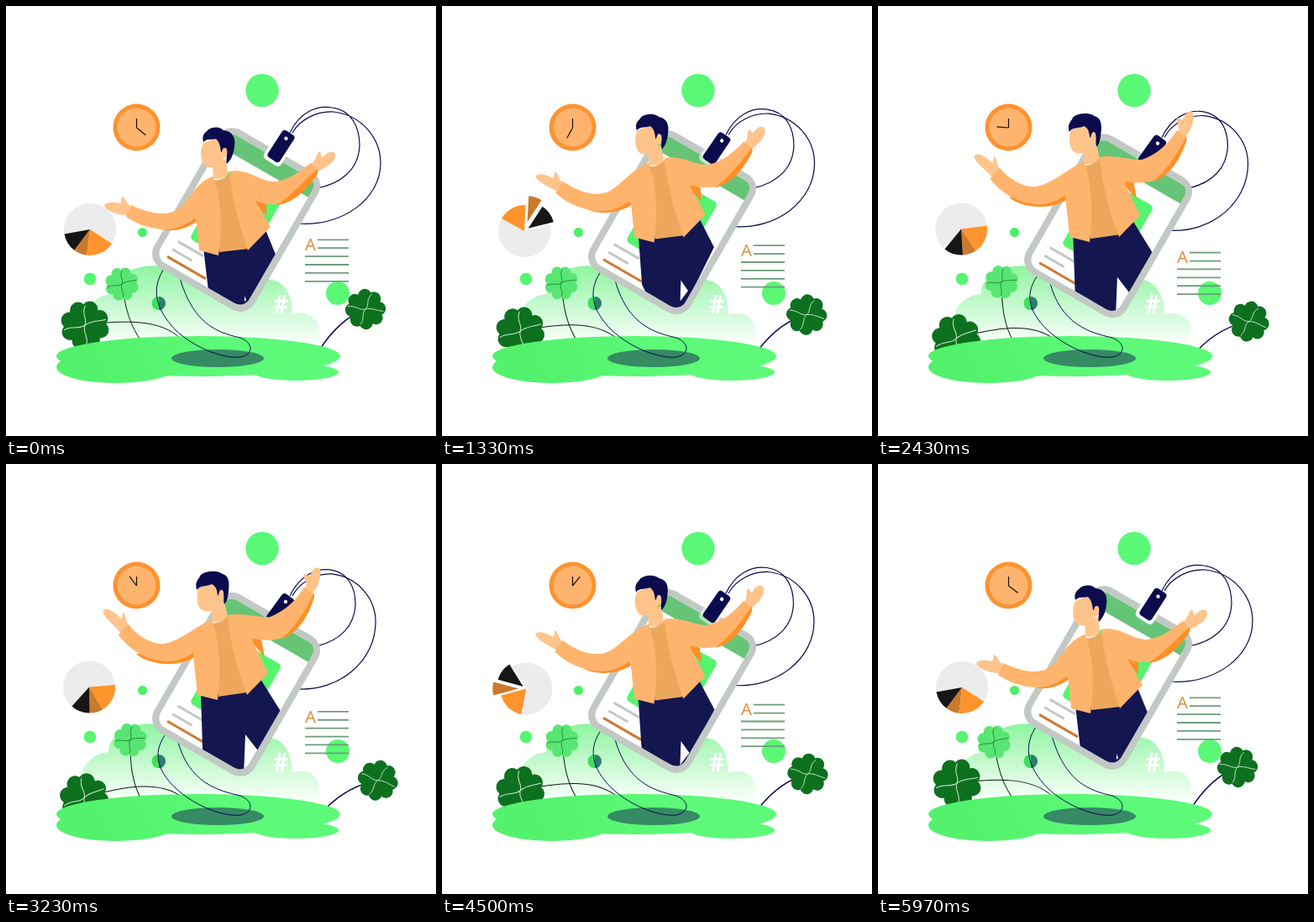
Animation, 512 px wide and 512 px high, one loop 6 s. Source, as an HTML page:

```html
<!DOCTYPE html>
<html lang="en">
<head>
<meta charset="utf-8">
<title>Man stepping out of a phone</title>
<style>
html, body { margin: 0; width: 100%; height: 100%; overflow: hidden; background: #fff; }
svg { display: block; width: 100vw; height: 100vh; }
</style>
</head>
<body>
<svg viewBox="0 0 512 512">
  <defs>
    <linearGradient id="mist" x1="0" y1="0" x2="0" y2="1">
      <stop offset="0" stop-color="#8ef4a0"/><stop offset="0.95" stop-color="#fff"/>
    </linearGradient>
    <linearGradient id="grass" gradientUnits="userSpaceOnUse" x1="120" y1="450" x2="260" y2="390">
      <stop offset="0" stop-color="#52f26c"/><stop offset="1" stop-color="#5cfa78"/>
    </linearGradient>
    <clipPath id="screen"><rect id="screenBox" x="-61" y="-87" width="122" height="174" rx="13"/></clipPath>
  </defs>
  <g id="scene"></g>
</svg>
<script>
const LOOP = 6000, NAVY = '#0b0b4d', SKIN = '#fec48b', COAT = '#ffb46d', DEEP = '#ff8f26';
const sceneEl = document.getElementById('scene');
const screenBox = document.getElementById('screenBox');

const ease = x => (1 - Math.cos(Math.PI * Math.min(1, Math.max(0, x)))) / 2;
const seg = (t, a, b) => ease((t - a) / (b - a));
const circle = (x, y, r, fill) => `<circle cx="${x}" cy="${y}" r="${r}" fill="${fill}"/>`;
const oval = (x, y, rx, ry, fill) => `<ellipse cx="${x}" cy="${y}" rx="${rx}" ry="${ry}" fill="${fill}"/>`;
const path = (d, fill) => `<path d="${d}" fill="${fill}"/>`;
const line = (d, color, width = 1) => `<path d="${d}" fill="none" stroke="${color}" stroke-width="${width}"/>`;
const group = (transform, body) => `<g transform="${transform}">${body}</g>`;

// Blend two paths that share the same commands.
function mix(a, b, p) {
  const re = /-?[\d.]+/g, to = b.match(re);
  let i = 0;
  return a.replace(re, n => (+n + (to[i++] - n) * p).toFixed(2));
}

// Man: [fill, arms-low pose, arms-high pose]
const legs = [
  ['#13164f',
    'M235 288L308 264L321 296L286 366L252 364L241 339Z',
    'M232 272L304 258L328 296L290 374L250 374L234 342Z'],
  ['#fff', 'M284 345L286 350L284 352Z', 'M285 322L303 345L283 372Z']
];
const leftArm = [
  [SKIN, 'M148 238C144 236 142 228 138 227C136 230 139 234 135 235C128 233 118 233 117 238C120 244 132 249 145 249Z',
    'M147 192C142 188 144 180 140 176C138 178 140 184 137 183C131 177 121 169 116 174C115 180 126 188 137 201Z'],
  [DEEP, 'M180 262C190 271 212 268 228 256L222 248Z', 'M155 226C172 241 208 241 224 230L222 220Z'],
  [COAT, 'M247 203C225 208 216 238 201 244C185 251 166 245 149 237L143 251C158 262 180 267 194 266C208 264 220 258 230 248Z',
    'M245 185C225 194 206 212 186 214C170 213 155 203 146 190L134 203C148 222 168 234 193 235C208 234 218 229 228 220Z']
];
const body = [
  [SKIN, 'M246 186L262 182L264 200C260 206 250 207 247 204Z', 'M244 168L260 164L264 182C260 188 249 190 245 187Z'],
  ['#eda75c', 'M246 207C254 209 262 204 268 198L290 250L289 289L254 293Z',
    'M244 189C252 191 260 186 264 180L288 232L287 272L253 277Z'],
  [DEEP, 'M288 228L310 236L310 250Z', 'M285 203L304 209L308 230Z'],
  [COAT, 'M247 203C232 210 222 235 227 260L230 291L253 297C258 260 257 235 247 203Z',
    'M245 185C230 192 220 212 224 238L228 275L252 281C256 245 255 215 245 185Z'],
  [COAT, 'M266 197C280 194 290 200 294 210L297 232L315 263L288 291C278 260 270 235 266 197Z',
    'M263 180C278 177 287 180 290 188L294 212L312 249L287 275C275 245 268 215 263 180Z'],
  [SKIN, 'M363 188C369 185 369 177 373 173C377 174 374 181 377 180C381 176 388 170 392 176C393 185 384 191 371 197Z',
    'M356 148C360 142 354 136 354 131C358 130 360 136 363 130C365 123 372 120 374 126C375 135 372 145 365 154Z'],
  [COAT, 'M268 197C290 194 300 208 318 209C338 208 350 196 363 187L372 197C356 216 342 232 322 236C308 237 296 232 288 228Z',
    'M266 180C285 177 300 183 314 182C332 175 346 162 355 146L367 155C360 178 348 200 328 207C312 212 296 209 285 205Z'],
  [DEEP, 'M371 194L371 200C357 221 341 235 322 237C342 224 355 208 371 194Z',
    'M367 152L367 158C360 181 348 201 328 208C342 196 355 178 367 152Z'],
  [SKIN, 'M235 163C230 172 231 190 241 192C251 194 257 187 259 181C266 181 267 169 260 169L254 156Z',
    'M229 148C226 158 227 173 236 175C247 177 253 170 255 164C262 163 262 151 256 151L250 140Z'],
  [NAVY, 'M235 162C232 152 240 149 241 147C247 143 255 144 259 148C268 149 274 155 272 167C271 178 267 184 263 188C261 183 266 170 261 169C257 168 258 174 256 174C255 168 255 163 250 158C245 160 240 157 235 162Z',
    'M227 150C224 140 230 137 231 133C236 127 252 126 258 131C265 133 266 140 265 150C264 160 263 164 260 167C258 162 261 152 257 150C253 149 254 156 252 157C251 151 251 146 245 143C239 146 232 144 227 150Z']
];
const draw = (parts, p) => parts.map(([fill, a, b]) => path(mix(a, b, p), fill)).join('');

function clover(x, y, size, turn, fill, vein) {
  const leaf = circle(-7.8, -17.5, 9.6, fill) + circle(7.8, -17.5, 9.6, fill) + path('M0 4L-16 -12L0 -22L16 -12Z', fill);
  const leaves = [45, 135, 225, 315].map(a => group(`rotate(${a})`, leaf)).join('');
  const veins = line('M-25 4C-14 -1 -8 5 0 0S14 -3 25 -5M2 -23C-4 -12 4 -8 0 0S4 14 0 23', vein);
  return group(`translate(${x} ${y}) rotate(${turn}) scale(${size / 28.5})`, leaves + veins);
}

function plants(p) {
  return group(`rotate(${-9 * p} 205 394)`,
      line('M94 380C145 373 185 374 208 396', '#101a14') + clover(94, 380, 29, -4, '#0d701f', '#c9e8ce')) +
    group(`rotate(${8.5 * p} 160 397)`,
      line('M138 331C142 360 148 382 162 400', '#101a14') + clover(138, 331, 20, -4, '#58e672', '#156b2a')) +
    line(mix('M428 361C408 368 388 386 373 410', 'M443 377C420 381 400 391 381 410', p), NAVY, 1.5) +
    clover(428 + 15 * p, 361 + 16 * p, 24, 18 + 14 * p, '#0d701f', '#c9e8ce');
}

function clock(t) {
  return circle(155.5, 144.5, 28, '#ff9230') + circle(155.5, 144.5, 23, '#ffb46d') +
    line('M155.5 145V134', '#16110b', 1.2) +
    group(`rotate(${129 + t * 360 / LOOP} 155.5 145)`, line('M155.5 145V131', '#16110b', 1.2));
}

function slice(from, to, fill, pull) {
  const at = (deg, r) => [100 + r * Math.cos(deg * Math.PI / 180), 266 + r * Math.sin(deg * Math.PI / 180)];
  const [x, y] = at((from + to) / 2, pull);
  return group(`translate(${x - 100} ${y - 266})`,
    path(`M100 266L${at(from, 31)}A31 31 0 ${to - from > 180 ? 1 : 0} 1 ${at(to, 31)}Z`, fill));
}

function pie(t) {
  const turn = 320 * seg(t, 0, 2500) + 108 * seg(t, 3150, 4050) + 292 * seg(t, 4500, 6000);
  const pull = 12 * (seg(t, 950, 1400) - seg(t, 1650, 2000) + seg(t, 4400, 4550) - seg(t, 5300, 5700));
  return group(`rotate(${turn} 99 267)`,
    slice(170, 393, '#ececec', 0) + slice(33, 97, '#ff942c', 0) +
    slice(97, 127, '#c97a2b', pull) + slice(127, 170, '#161616', pull / 2));
}

function note(p) {
  let out = `<text x="356" y="291" font-family="'Open Sans', sans-serif" font-size="20.5" fill="#e08a3a">A</text>`;
  for (let i = 0; i < 6; i++) out += line(`M${i < 2 ? 371 : 356} ${278.3 + 9.9 * i}H408`, '#6f9d7c', 1.8);
  return group(`translate(0 ${16.8 * p})`, out);
}

function strings(p) {
  return line(mix(
    'M338 151C350 126 370 118 388 121C412 124 421 145 421 166C420 195 398 212 370 217',
    'M338 157C350 132 370 124 386 126C408 129 416 148 416 167C415 193 398 210 370 217', p), NAVY, 1.2) +
    line(mix(
    'M341 151C350 135 370 125 390 126C424 130 446 158 446 187C446 230 400 263 348 259',
    'M341 157C350 140 370 130 388 131C420 135 440 161 440 188C440 234 398 271 346 268', p), NAVY, 1.2);
}

function phone() {
  return `<rect x="-69" y="-95" width="138" height="190" rx="20" fill="#c2c9c4"/>
    <rect x="-61" y="-87" width="122" height="174" rx="13" fill="#fff"/>
    <path d="M-61 -66V-74Q-61 -87 -48 -87H48Q61 -87 61 -74V-66Z" fill="#66c476"/>
    <rect x="-37" y="-47" width="73" height="94" rx="5" fill="#55f46e"/>` +
    line('M-47 57H-12M-48 68.5H-21', '#c2c9c4', 3) + line('M-49 79H4', '#cc7a33', 3);
}

function tag(p) {
  return group(`translate(${327.5 - p} ${167 + 6 * p}) rotate(${33 + 3 * p})`,
    `<rect x="-12" y="5" width="24" height="18" rx="5" fill="#fff" opacity="${1 - p}"/>
     <rect x="-8.5" y="-19" width="17" height="38" rx="4" fill="${NAVY}"/>` + circle(0, -11, 2.2, '#fff'));
}

function backdrop(p) {
  return group(`translate(373 0) scale(${1 + .016 * p} 1) translate(-373 0)`,
      path('M95 410C87 384 92 346 126 343C126 318 160 306 186 310C230 305 270 320 300 328C330 318 342 345 341 368C354 362 373 368 373 386V410Z', 'url(#mist)')) +
    `<text x="318" y="365.5" font-family="Roboto, sans-serif" font-weight="900" font-size="32" fill="#fff">#</text>` +
    plants(p) +
    oval(229, 417, 169, 24, 'url(#grass)') + oval(131, 430, 71, 19, 'url(#grass)') +
    oval(345, 436, 51, 10, 'url(#grass)') + oval(252, 419.5, 55, 10.5, '#368a64') +
    circle(305, 100.5, 19.7, '#5af877') + circle(162.5, 269.5, 5.5, '#4af066') +
    circle(100, 325, 7.3, '#55f670') + circle(395, 342, 14, '#5af875') +
    circle(181.5, 354, 8, '#3ee05e') + path('M182 346A8 8 0 0 1 182 362Z', '#2f7d70');
}

function scene(t) {
  const p = (1 - Math.cos(2 * Math.PI * t / LOOP)) / 2;
  const lift = seg(t, 0, 1330) - seg(t, 3700, LOOP);
  const rise = `translate(0 ${-15 * (lift - p)})`;
  const reach = 1 + .18 * p * (1 - p); // the left hand swings outwards on an arc
  const pose = `translate(274 ${254.5 + 8 * p}) rotate(30)`;
  screenBox.setAttribute('transform', pose);
  const cord = mix(
    'M190 310C172 335 177 360 202 386C228 410 262 420 279 418C294 415 296 402 279 395C253 389 222 380 206 320',
    'M193 318C174 341 178 363 202 386C228 410 262 420 279 418C294 415 296 402 279 395C253 389 217 380 204 328', p);
  return backdrop(p) + line(cord, NAVY) + clock(t) + pie(t) + note(p) + strings(p) +
    group(pose, phone()) + tag(p) +
    `<g clip-path="url(#screen)">${group(rise, draw(legs, p))}</g>` +
    group(rise,
      group(`translate(235 0) scale(${reach} 1) translate(-235 0)`, draw(leftArm, p)) + draw(body, p));
}

let start;
function tick(now) {
  start ??= now;
  sceneEl.innerHTML = scene((now - start) % LOOP);
  requestAnimationFrame(tick);
}
sceneEl.innerHTML = scene(0);
requestAnimationFrame(tick);
</script>
</body>
</html>
```
